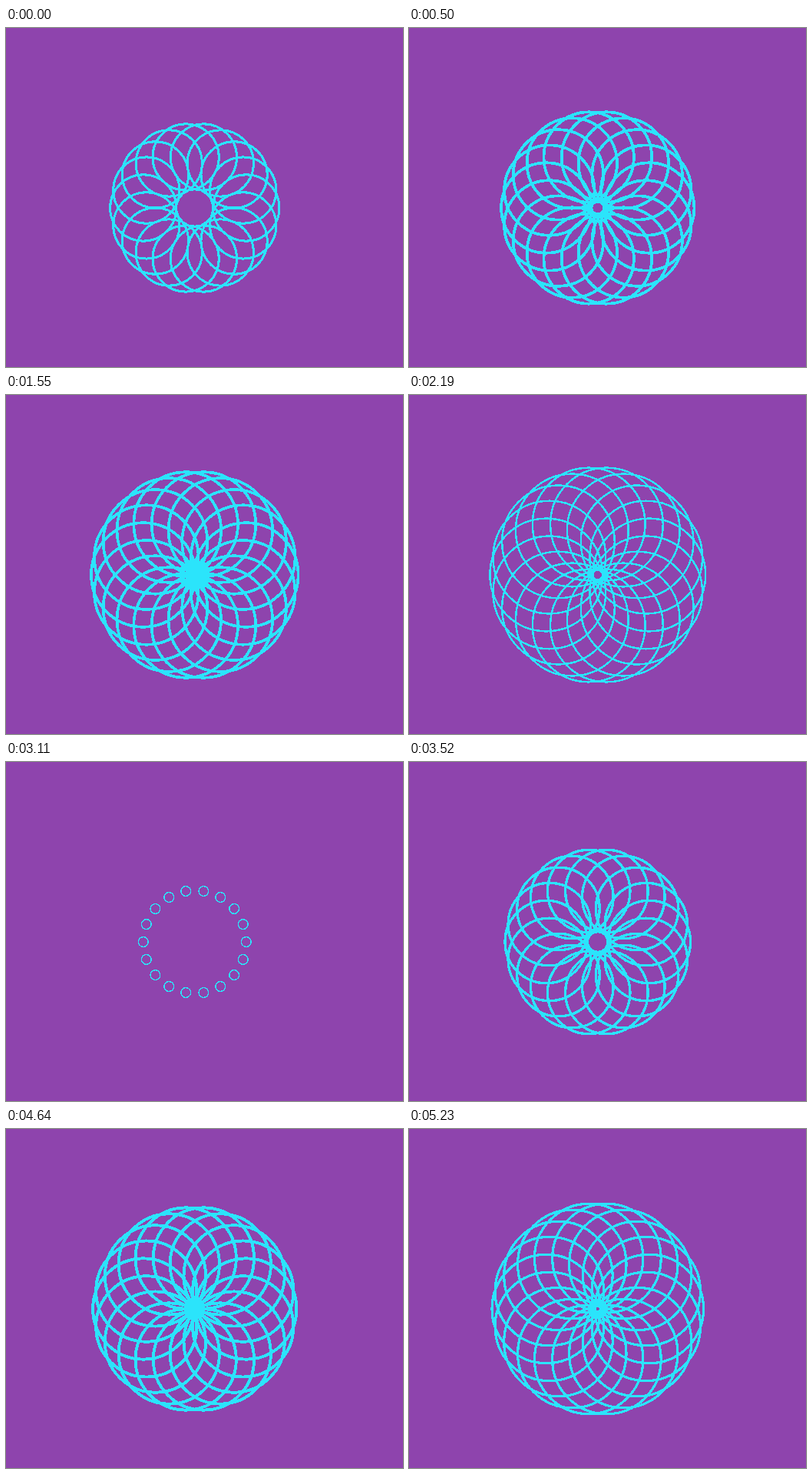
An HTML page that plays this animation: 517 px wide and 441 px high, repeating every 5260 ms.

```html
<!DOCTYPE html>
<html lang="en">
<head>
<meta charset="utf-8">
<title>Ring of circles</title>
<style>
  html, body { margin: 0; width: 100%; height: 100%; overflow: hidden; background: #8e44ad; }
  svg { display: block; }
  circle { fill: none; stroke: #2be4fb; shape-rendering: crispEdges; }
</style>
</head>
<body>
<svg width="517" height="441" viewBox="0 0 517 441"><g id="ring"></g></svg>
<script>
  const LOOP = 5260, CYCLE = 3340, LEAD = 340;
  const COUNT = 18, RING = 67, CX = 245.8, CY = 234;
  const START = -254, DURATION = 3425;
  const ring = document.getElementById('ring');

  const circles = Array.from({ length: COUNT }, (_, i) => {
    const angle = i * 2 * Math.PI / COUNT;
    const circle = document.createElementNS('http://www.w3.org/2000/svg', 'circle');
    circle.setAttribute('cx', CX + RING * Math.cos(angle));
    circle.setAttribute('cy', CY + RING * Math.sin(angle));
    return ring.appendChild(circle);
  });

  // Fast start and end around a slow, linear middle.
  function slowMiddle(p) {
    const edge = 0.228, slope = 0.222;
    const line = 0.5 + (p - 0.5) * slope;
    const rise = Math.max(0, 1 - p / edge);
    const rush = Math.max(0, 1 - (1 - p) / edge);
    return line * (1 - rise ** 4) + (1 - line) * rush ** 4;
  }

  function radius(t) {
    const p = Math.min(1, Math.max(0, (t - START) / DURATION));
    return 2 * RING * slowMiddle(p);
  }

  // Thickest mid-cycle, and never heavy on a tiny circle.
  function weight(t, r) {
    const away = Math.abs(t - 1000) / 1840;
    return Math.max(0, Math.min(4 * (1 - away ** 2.25), r * 0.22));
  }

  function draw(now) {
    const t = (now % LOOP + LEAD) % CYCLE - LEAD;
    const r = radius(t), line = weight(t, r);
    ring.style.display = line > 0.1 ? '' : 'none';
    ring.setAttribute('stroke-width', line);
    for (const circle of circles) circle.setAttribute('r', r);
  }

  const start = performance.now();
  function tick() {
    draw(performance.now() - start);
    requestAnimationFrame(tick);
  }
  tick();
</script>
</body>
</html>
```
